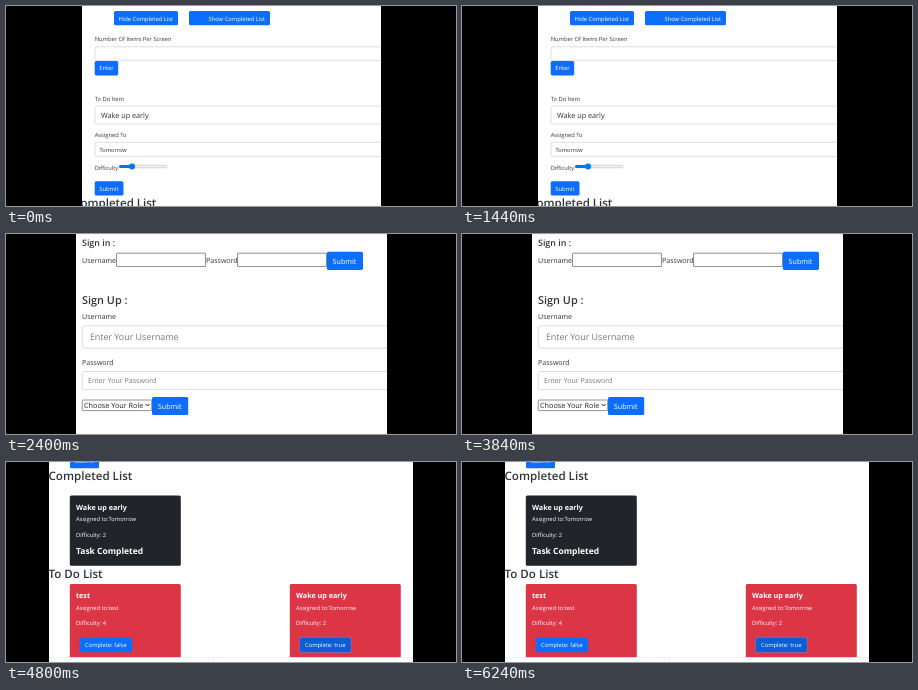
An HTML page with a canvas that plays this animation: 450 px wide and 200 px high, repeating every 7.2 s.

```html
<!DOCTYPE html>
<html lang="en">
<head>
<meta charset="utf-8">
<title>To do app</title>
<style>
  html, body { margin: 0; width: 100%; height: 100%; overflow: hidden; background: #000; }
  canvas { display: block; width: 450px; height: 200px; }
</style>
</head>
<body>
<canvas id="stage" width="450" height="200"></canvas>
<script>
const ctx = document.getElementById('stage').getContext('2d');
const SCENE_MS = 2400;
const BLUE = '#0d6efd', INK = '#212529', TEXT = '#30353a', BORDER = '#d3d8dd', RED = '#dc3545';

// Small type needs unhinted glyphs and fractional advances.
ctx.textRendering = 'geometricPrecision';

function text(str, x, y, size, color = TEXT, weight = 400) {
  ctx.font = `${weight} ${size}px "Open Sans", "Noto Sans", sans-serif`;
  ctx.fillStyle = color;
  ctx.fillText(str, x, y);
}

function box(x, y, w, h, radius, fill, stroke, line = 0.8) {
  ctx.beginPath();
  ctx.roundRect(x, y, w, h, radius);
  if (fill) {
    ctx.fillStyle = fill;
    ctx.fill();
  }
  if (stroke) {
    ctx.strokeStyle = stroke;
    ctx.lineWidth = line;
    ctx.stroke();
  }
}

function button(label, x, y, w, h, textX, baseline, size = 5.8, fill = BLUE) {
  box(x, y, w, h, 1.6, fill);
  text(label, textX, baseline, size, '#fff', 500);
}

// Limits drawing to the white page between the black side bars.
function page(left, right, draw) {
  ctx.save();
  ctx.beginPath();
  ctx.rect(left, 0, right - left, 200);
  ctx.clip();
  ctx.fillStyle = '#fff';
  ctx.fillRect(left, 0, right - left, 200);
  draw();
  ctx.restore();
}

function slider(x, y, width, thumbX) {
  box(x, y - 1.3, width, 2.6, 1.3, '#efefef', '#b2b2b2', 0.5);
  box(x, y - 1.5, thumbX - x, 3, 1.5, '#0075ff');
  box(thumbX - 3, y - 3, 6, 6, 3, '#0075ff');
}

function itemForm() {
  button('Hide Completed List', 108, 5, 64, 14.3, 112.5, 14.5);
  button('Show Completed List', 183, 5, 81, 14.3, 202.5, 14.5);
  text('Number Of Items Per Screen', 88.7, 35.2, 5.75);
  box(89, 40.8, 300, 13.6, 1.5, '#fff', BORDER);
  button('Enter', 88.7, 55, 23.5, 14.4, 93.2, 64.4);
  text('To Do Item', 88.7, 94.6, 5.75);
  box(89, 100, 300, 18, 1.8, '#fff', BORDER);
  text('Wake up early', 95, 112, 7.25);
  text('Assigned To', 88.7, 130.7, 5.75);
  box(89, 136.4, 300, 14, 1.5, '#fff', BORDER);
  text('Tomorrow', 93.6, 145.7, 5.7);
  text('Difficulty', 88.7, 163.7, 5.7);
  slider(113, 160.5, 48, 126);
  button('Submit', 88.7, 175.2, 28.8, 14.3, 93.3, 184.5);
  text('Completed List', 67.2, 201, 11.5, TEXT, 600);
}

function signInForm() {
  text('Sign in :', 76, 12.2, 8.9, TEXT, 600);
  text('Username', 76, 29.2, 7.05);
  box(110.5, 19.2, 89, 13.3, 0.5, '#fff', '#767676');
  text('Password', 200, 29.2, 7.05);
  box(231.5, 19.2, 89, 13.3, 0.5, '#fff', '#767676');
  button('Submit', 320.8, 17.7, 36.2, 18.2, 326.6, 29.5, 7.2);
  text('Sign Up :', 76, 70.1, 10.9, TEXT, 600);
  text('Username', 76, 84.8, 7.05);
  box(76.3, 91.8, 330, 22.5, 2.2, '#fff', BORDER);
  text('Enter Your Username', 83.9, 106.4, 8.9, '#747c84');
  text('Password', 76, 130.6, 7.05);
  box(76.3, 137.5, 330, 18, 1.8, '#fff', BORDER);
  text('Enter Your Password', 82, 149.2, 7.1, '#747c84');
  box(76.3, 166, 69.4, 10.6, 0.5, '#fff', '#767676');
  text('Choose Your Role', 78, 174, 7.25, '#222');
  ctx.strokeStyle = '#222';
  ctx.lineWidth = 1;
  ctx.beginPath();
  ctx.moveTo(139.7, 170);
  ctx.lineTo(141.6, 172);
  ctx.lineTo(143.5, 170);
  ctx.stroke();
  button('Submit', 146, 163, 36.2, 18, 151.8, 174.7, 7.2);
}

function card(x, y, h, fill, title, owner, difficulty) {
  box(x, y, 111, h, 1.6, fill);
  text(title, x + 6.2, y + 14.1, 7.2, '#fff', 700);
  text('Assigned to:' + owner, x + 6.2, y + 25.8, 5.75, '#fff', 500);
  text('Difficulty: ' + difficulty, x + 6.2, y + 41.1, 5.75, '#fff', 500);
}

function listView() {
  button('Submit', 64, -8, 29, 14.3, 68.5, 1.3);
  text('Completed List', 42.5, 18.3, 11.6, TEXT, 600);
  card(63.8, 33.5, 70.3, INK, 'Wake up early', 'Tomorrow', 2);
  text('Task Completed', 70, 92.4, 8.5, '#fff', 700);
  text('To Do List', 42.5, 116.1, 11.6, TEXT, 600);
  card(63.8, 122, 80, RED, 'test', 'test', 4);
  button('Complete: false', 73.8, 176, 52.4, 14.2, 79, 185.3);
  card(283.8, 122, 80, RED, 'Wake up early', 'Tomorrow', 2);
  box(292.8, 174.6, 53, 16.4, 2, '#9d5a96');
  button('Complete: true', 294, 175.8, 50.8, 14.2, 299, 185.3, 5.8, '#0b5ed7');
  ctx.fillStyle = '#fff';
  ctx.fillRect(43, 195.3, 364, 5);
  ctx.fillStyle = '#e3e5e8';
  ctx.fillRect(43, 195.3, 364, 0.6);
  ctx.fillRect(207, 196, 0.6, 4);
}

const scenes = [
  [76, 375, itemForm],
  [70, 381, signInForm],
  [43, 407, listView],
];

function render(now) {
  ctx.fillStyle = '#000';
  ctx.fillRect(0, 0, 450, 200);
  page(...scenes[Math.floor(now / SCENE_MS) % scenes.length]);
}

const start = performance.now();
function tick() {
  render(performance.now() - start);
  requestAnimationFrame(tick);
}
tick();
</script>
</body>
</html>
```
